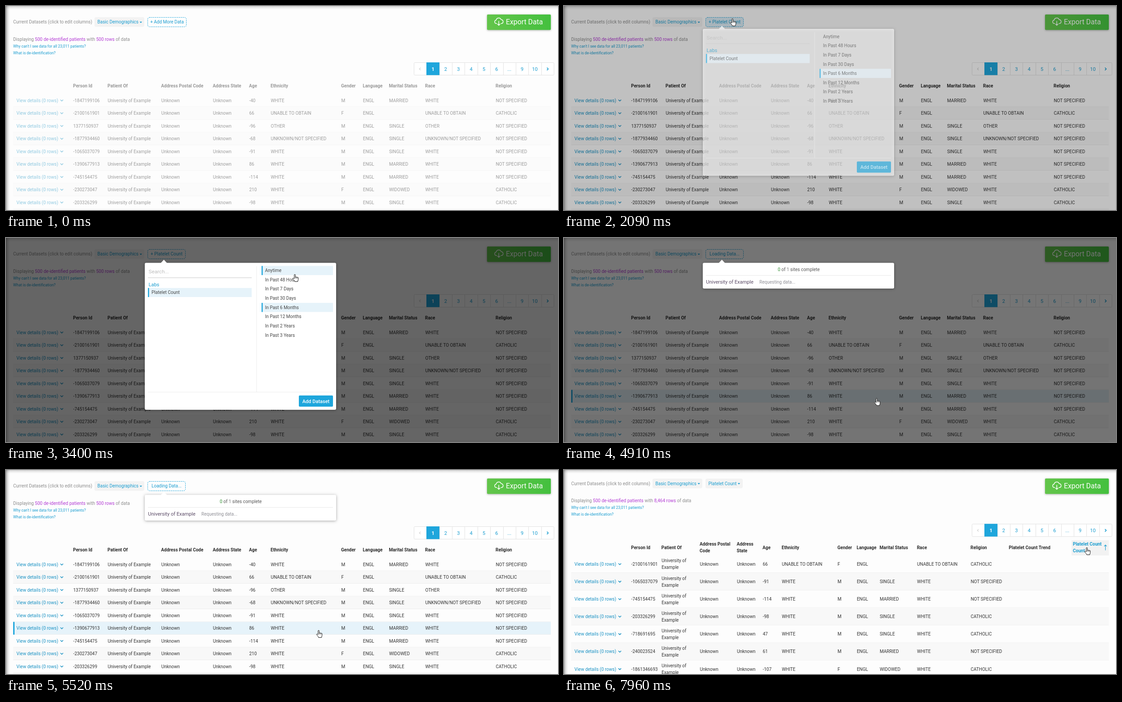
These frames come from a looping animation (1229x456 px, 8 s). An HTML page with a canvas:

```html
<!DOCTYPE html>
<html lang="en">
<head>
<meta charset="utf-8">
<title>Adding a dataset</title>
<style>
html, body { margin: 0; width: 100%; height: 100%; overflow: hidden; background: #fdfdfd; }
canvas { display: block; width: 1229px; height: 456px; }
</style>
</head>
<body>
<canvas id="stage"></canvas>
<script>
const W = 1229, H = 456, LOOP = 8000;
const BLUE = '#1ea6dc', LINK = '#1a9dd0', PURPLE = '#b23bd4', GREY = '#8c8c8c', INK = '#333', TINT = '#e6f3fa';
const canvas = document.getElementById('stage');
const ratio = window.devicePixelRatio || 1;
canvas.width = W * ratio;
canvas.height = H * ratio;
const c = canvas.getContext('2d');

// Moments at which the interface changes
const T = { cursor: 670, open: 1960, pick: 3700, submit: 4740, loaded: 6060, sort: 7700 };

const clamp = v => Math.max(0, Math.min(1, v));
const span = (t, from, to) => clamp((t - from) / (to - from));
const easeOut = p => 1 - (1 - p) * (1 - p);
const smooth = p => p * p * (3 - 2 * p);

// Fingertip path: time, x, y, and 1 where the move ends in an ease
const path = [
  [670, 742, 296], [1120, 675, 259], [1300, 610, 175], [1440, 540, 80], [1600, 425, 44],
  [1760, 375, 28], [2630, 375, 28], [2900, 490, 52], [3170, 632, 87], [3320, 640, 85],
  [3400, 643, 81], [3550, 642, 75], [3850, 642, 74], [4520, 696, 358, 1], [6320, 696, 358],
  [7180, 1097, 171, 1], [7300, 1124, 163], [7480, 1156, 186], [7560, 1160, 187],
  [7730, 1163, 174], [7960, 1164, 173]
];

function cursorAt(t) {
  if (t < T.cursor) return { x: -100, y: -100 };
  const i = path.findIndex(k => k[0] > t);
  if (i < 1) { const k = path[path.length - 1]; return { x: k[1], y: k[2] }; }
  const a = path[i - 1], b = path[i];
  let p = span(t, a[0], b[0]);
  if (b[3]) p = smooth(p);
  return { x: a[1] + (b[1] - a[1]) * p, y: a[2] + (b[2] - a[2]) * p };
}

const within = (p, x, y, w, h) => p.x >= x && p.x < x + w && p.y >= y && p.y < y + h;

function text(s, x, y, color = INK, size = 10, weight = 400, align = 'left') {
  c.font = `${weight} ${size}px Roboto, sans-serif`;
  c.textAlign = align;
  c.fillStyle = color;
  c.fillText(s, x, y + size * 0.355);
  return x + c.measureText(s).width;
}

function runs(parts, x, y) {
  for (const [s, color] of parts) x = text(s, x, y, color);
}

function rect(x, y, w, h, color) {
  c.fillStyle = color;
  c.fillRect(x, y, w, h);
}

function round(x, y, w, h, r) {
  c.beginPath();
  c.roundRect(x, y, w, h, r);
}

function stroke(d, color, width) {
  c.strokeStyle = color;
  c.lineWidth = width;
  c.stroke(new Path2D(d));
}

function shadow(color, blur, dy) {
  c.shadowColor = color;
  c.shadowBlur = blur * ratio;
  c.shadowOffsetY = dy * ratio;
}

function marked(x, y, w, h) {
  rect(x, y, w, h, TINT);
  rect(x, y, 2.5, h, BLUE);
}

function pill(label, x, w) {
  round(x, 25, w, 21.5, 4);
  c.fillStyle = '#f3f3f3';
  c.fill();
  const end = text(label, x + 6.5, 35.8, LINK);
  c.fillStyle = LINK;
  c.fill(new Path2D(`M${end + 2.5} 35h5.4l-2.7 3z`));
}

function dashed(label, x, w, hover) {
  round(x + 0.5, 25.5, w - 1, 21, 4);
  c.fillStyle = hover ? '#dceef7' : '#fdfdfd';
  c.fill();
  c.setLineDash([2.5, 1.6]);
  c.strokeStyle = BLUE;
  c.lineWidth = 1;
  c.stroke();
  c.setLineDash([]);
  text(label, x + w / 2, 35.8, LINK, 10, 400, 'center');
}

function edges() {
  const top = c.createLinearGradient(0, 0, 0, 8);
  top.addColorStop(0, 'rgba(0,0,0,.2)');
  top.addColorStop(0.4, 'rgba(0,0,0,.08)');
  top.addColorStop(1, 'rgba(0,0,0,0)');
  rect(0, 0, W, 8, top);
  const left = c.createLinearGradient(0, 0, 9, 0);
  left.addColorStop(0, 'rgba(0,0,0,.32)');
  left.addColorStop(0.45, 'rgba(0,0,0,.1)');
  left.addColorStop(1, 'rgba(0,0,0,0)');
  rect(0, 0, 9, H, left);
}

function exportButton() {
  const g = c.createLinearGradient(1071, 53, 1213, 19);
  g.addColorStop(0, '#64c54b');
  g.addColorStop(1, '#43c03e');
  c.save();
  shadow('rgba(0,0,0,.3)', 4, 1);
  round(1071, 19, 142, 34.5, 2);
  c.fillStyle = g;
  c.fill();
  c.restore();
  stroke('M1093 39.3h-1.4a4 4 0 0 1-.3-7.9a5.8 5.8 0 0 1 11.1-1a4.5 4.5 0 0 1 .8 8.9h-1.6M1097.2 33.5v9.5m-3.2-3l3.2 3.2l3.2-3.2', '#fff', 1.5);
  text('Export Data', 1113, 35.5, '#fff', 15.8);
}

function pager() {
  const x0 = 908, step = 28.36;
  round(x0 + 0.5, 126.5, 311.5, 28, 2);
  c.fillStyle = '#fff';
  c.fill();
  c.strokeStyle = '#e2e2e2';
  c.lineWidth = 1;
  c.stroke();
  ['', '1', '2', '3', '4', '5', '6', '...', '9', '10', ''].forEach((s, i) => {
    const x = x0 + i * step;
    if (i) rect(Math.round(x), 127, 1, 27, '#e2e2e2');
    if (i === 1) rect(Math.round(x), 126, 29, 28.5, BLUE);
    text(s, x + step / 2, 140.6, i === 1 ? '#fff' : LINK, 11, i === 1 ? 700 : 400, 'center');
  });
  stroke('M923 138l-2.6 2.7l2.6 2.7', '#cfcfcf', 1.2);
  stroke('M1204.4 137.8l2.9 2.9l-2.9 2.9', LINK, 1.6);
}

function topBar(t, cur) {
  const done = t >= T.loaded;
  c.save();
  if (done) c.translate(0, -5.7);
  text('Current Datasets (click to edit columns)', 16, 35.8, GREY);
  pill('Basic Demographics', 197, 111);
  if (done) pill('Platelet Count', 315, 83);
  else if (t < T.open) dashed('+ Add More Data', 315, 87, within(cur, 315, 25, 87, 22));
  else if (t < T.submit) dashed('+ Platelet Count', 315, 85, within(cur, 315, 25, 85, 22));
  else dashed('Loading Data...', 315, 85);
  runs([['Displaying ', GREY], ['500 de-identified patients', PURPLE], [' with ', GREY],
    [done ? '8,464 rows' : '500 rows', PURPLE], [' of data', GREY]], 16, 74.2);
  text("Why can't I see data for all 23,011 patients?", 16, 90, LINK, 8.45);
  text('What is de-identification?', 16, 105, LINK, 8.45);
  pager();
  c.restore();
}

const NS = 'NOT SPECIFIED', UNABLE = 'UNABLE TO OBTAIN', CATH = 'CATHOLIC';
// id, age, ethnicity and race, gender, marital status, religion, platelet rows
const people = [
  [-1847199106, -40, 'WHITE', 'M', 'MARRIED', NS, 12],
  [-2100161901, 66, UNABLE, 'F', '', CATH, 0],
  [1377150937, -96, 'OTHER', 'M', 'SINGLE', NS, 21],
  [-1877934460, -68, 'UNKNOWN/NOT SPECIFIED', 'M', 'SINGLE', NS, 17],
  [-1065037079, -91, 'WHITE', 'M', 'SINGLE', NS, 0],
  [-1390677913, 86, 'WHITE', 'M', 'MARRIED', NS, 14],
  [-745154475, -114, 'WHITE', 'M', 'MARRIED', NS, 0],
  [-230273047, 210, 'WHITE', 'F', 'WIDOWED', CATH, 19],
  [-203326299, -98, 'WHITE', 'M', 'SINGLE', CATH, 0],
  [-718691695, 47, 'WHITE', 'M', 'SINGLE', CATH, 0],
  [-240023524, 61, 'WHITE', 'M', 'MARRIED', NS, 0],
  [-1861346693, -107, 'WHITE', 'F', 'WIDOWED', CATH, 0]
];
const heads = ['Person Id', 'Patient Of', 'Address Postal Code', 'Address State', 'Age', 'Ethnicity',
  'Gender', 'Language', 'Marital Status', 'Race', 'Religion'];
const wideHeads = heads.map(h => h.replace('Postal Code', 'Postal\nCode').replace('ss State', 'ss\nState'))
  .concat('Platelet Count Trend', 'Platelet Count\nCount');
const narrow = { top: 197, step: 28.5, headY: 178.8, heads, school: 'University of Example',
  cols: [149.3, 226, 345.3, 460.3, 541, 589, 746, 794.3, 852.5, 933, 1090] };
const wide = { top: 191, step: 39.1, headY: 173.4, heads: wideHeads, school: 'University of\nExample',
  cols: [149.3, 216.8, 302, 384.5, 442, 484.5, 608.7, 651.5, 702.5, 785.7, 905, 990.3, 1133] };

function cell(s, x, y, color, weight) {
  const lines = String(s).split('\n');
  lines.forEach((line, i) => text(line, x, y + (i - (lines.length - 1) / 2) * 15, color, 10, weight));
}

function table(t, cur, covered) {
  const joined = t >= T.loaded, sorted = t >= T.sort;
  const L = joined ? wide : narrow;
  const rows = sorted ? people.filter(p => !p[6]) : people;
  const last = L.cols.length - 1;
  c.save();
  c.globalAlpha = joined ? 0.5 + 0.5 * span(t, T.loaded, 6250) : 0.47 + 0.53 * span(t, 20, 440);

  if (sorted) rect(1130, 157, 83, 34, '#f2f2f2');
  L.heads.forEach((h, i) => cell(h, L.cols[i], L.headY, sorted && i === last ? LINK : '#2b2b2b', 700));
  if (sorted) stroke('M1205.5 179.5v-12m-2.8 3l2.8-3l2.8 3', LINK, 1.1);

  rows.forEach((p, i) => {
    const y = L.top + i * L.step, mid = y + L.step / 2 - 0.2;
    if (y > H) return;
    const hover = !covered && within(cur, 16, y, 1197, L.step);
    rect(16, y, 1197, L.step, hover ? TINT : i % 2 ? '#f8f8f8' : '#fdfdfd');
    rect(16, y + L.step - 0.8, 1197, 0.8, '#ececec');
    if (hover) rect(16, y, 3, L.step, BLUE);
    const count = joined ? p[6] : 0;
    const end = text(`View details (${count} rows)`, 23.3, mid, '#1a92c4');
    stroke(`M${end + 5} ${mid - 1.6}l3 3l3-3`, '#1a92c4', 1.5);
    const values = [p[0], L.school, 'Unknown', 'Unknown', p[1], p[2], p[3], 'ENGL', p[4], p[2], p[5]];
    if (joined) values.push('', count || '');
    values.forEach((v, k) => cell(v, L.cols[k] + 0.4, mid, INK));
  });
  c.restore();
}

function panel(h) {
  c.save();
  shadow('rgba(0,0,0,.35)', 6, 1);
  c.fillStyle = '#fff';
  round(309, 55.5, 426, h, 3);
  c.fill();
  c.restore();
  c.fillStyle = '#fff';
  c.fill(new Path2D('M344.5 56l7-7.5l7 7.5z'));
}

const ranges = ['Anytime', 'In Past 48 Hours', 'In Past 7 Days', 'In Past 30 Days', 'In Past 6 Months',
  'In Past 12 Months', 'In Past 2 Years', 'In Past 3 Years'];

function picker(t, cur) {
  const p = easeOut(span(t, T.open, 2280));
  const dark = '#444';
  c.save();
  c.globalAlpha = p;
  c.translate(0, -13 * (1 - p));
  panel(328.5);
  text('Search...', 317.5, 75, '#bdbdbd', 11.7);
  rect(316, 88.3, 231, 1, '#c8c8c8');
  text('Labs', 317.5, 103.7, LINK, 11);
  marked(316, 111.7, 231, 20.3);
  text('Platelet Count', 324, 121.8, dark);
  rect(557.5, 63, 1, 281, '#ececec');
  rect(316, 344, 412, 1, '#ececec');
  const chosen = t < T.pick ? 4 : 0;
  ranges.forEach((s, i) => {
    const y = 62.5 + i * 20.62;
    if (i === chosen || within(cur, 569, y, 159, 20.6)) marked(569, y, 159, 20.4);
    text(s, 576.7, y + 10.2, dark);
  });
  round(652, 352, 76, 25, 2);
  c.fillStyle = BLUE;
  c.fill();
  text('Add Dataset', 690, 364.8, '#fff', 11, 500, 'center');
  c.restore();
}

function progress() {
  panel(57.5);
  runs([['0', '#2f8f2f'], [' of ', '#555'], ['1', '#777'], [' sites complete', '#555']], 476, 70);
  rect(316, 83, 412, 1, '#e8e8e8');
  text('University of Example', 316.3, 98.2, '#5a4a66', 11);
  text('Requesting data...', 435, 98.4, '#8f8f96');
}

const hand = new Path2D('M4.5 10.5V2.2a1.25 1.25 0 0 1 2.5 0V7a1.2 1.2 0 0 1 2.2.3a1.2 1.2 0 0 1 2.2.5a1.1 1.1 0 0 1 2 .8V12c0 2-1.2 3-1.2 5H5.6C5.4 14.8 2.6 12.6 1.2 10.6c-.8-1.3.8-2 1.8-1.1z');

function pointer(p) {
  c.save();
  c.translate(p.x - 5.7, p.y - 0.5);
  c.fillStyle = '#fff';
  c.fill(hand);
  c.strokeStyle = '#111';
  c.lineWidth = 1;
  c.lineJoin = 'round';
  c.stroke(hand);
  c.lineWidth = 0.8;
  c.stroke(new Path2D('M7 7v3M9.2 7.4v2.6M11.4 8v2'));
  c.restore();
}

function draw(t) {
  const cur = cursorAt(t);
  const picking = t >= T.open && t < T.submit;
  c.setTransform(ratio, 0, 0, ratio, 0, 0);
  rect(0, 0, W, H, '#fdfdfd');
  table(t, cur, picking);
  topBar(t, cur);
  exportButton();
  edges();
  const shade = 0.6 * easeOut(span(t, T.open, 2530)) * (1 - span(t, 4860, 5390));
  if (shade > 0) rect(0, 0, W, H, `rgba(0,0,0,${shade})`);
  if (picking) picker(t, cur);
  else if (t >= T.submit && t < T.loaded) progress();
  if (t >= T.cursor) pointer(cur);
}

const start = performance.now();
function tick() {
  draw((performance.now() - start) % LOOP);
  requestAnimationFrame(tick);
}
tick();
</script>
</body>
</html>
```
